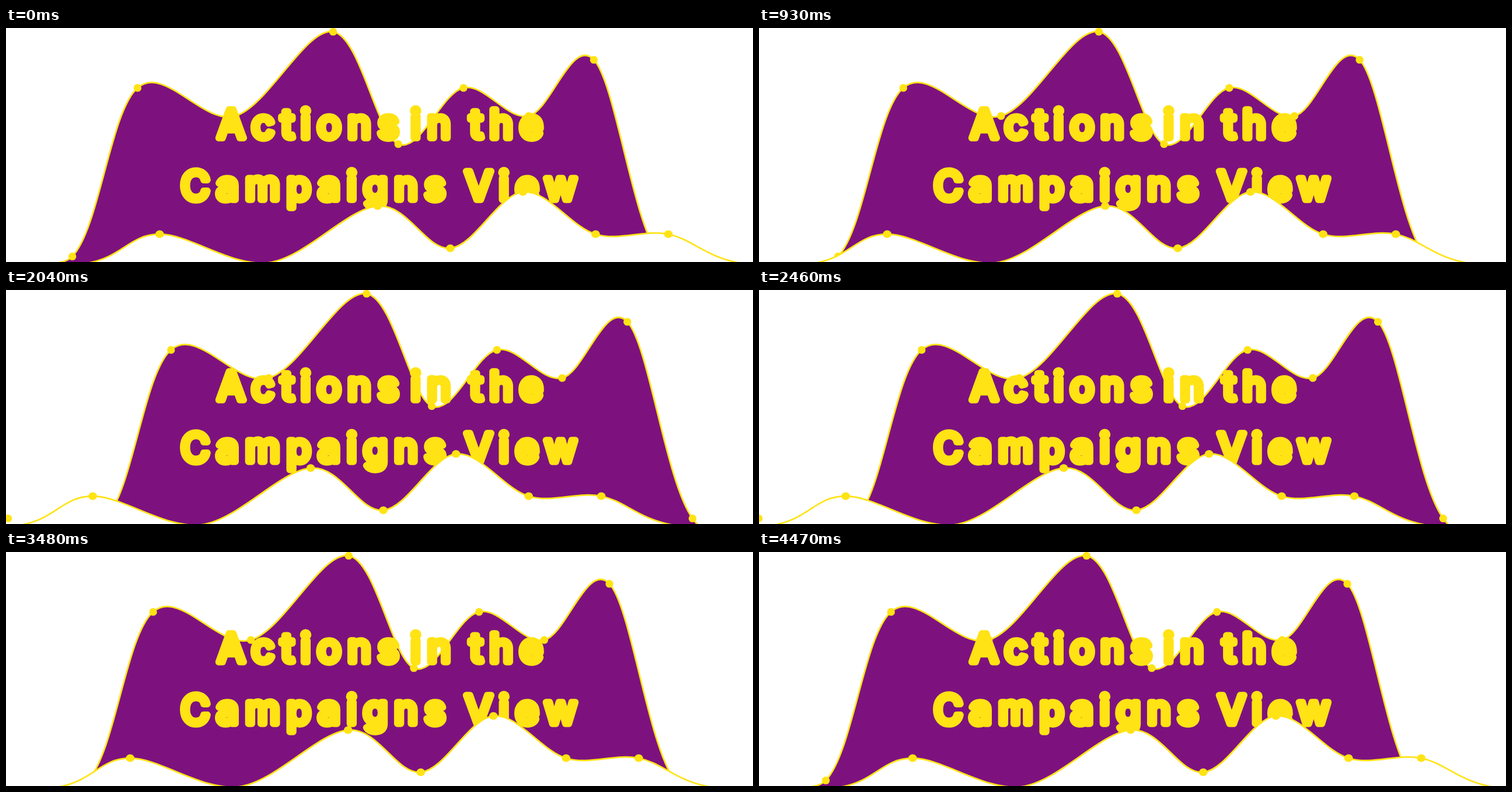
An HTML page with a canvas that plays this animation: 1280x402 px, repeating every 4500 ms.

```html
<!DOCTYPE html>
<html lang="en">
<head>
<meta charset="utf-8">
<title>Actions in the Campaigns View</title>
<style>
  html, body { margin: 0; width: 100%; height: 100%; overflow: hidden; background: #fff; }
  canvas { display: block; width: 100%; height: 100%; }
</style>
</head>
<body>
<canvas id="stage" width="1280" height="402"></canvas>
<script>
const ctx = document.getElementById('stage').getContext('2d');
const W = 1280, H = 402, LOOP = 4500;
const PURPLE = '#7d127f', YELLOW = '#ffe314';

// Waves: [column, level] pairs; the first and last points only shape the ends.
const toPoints = (pairs, dx, top, dy) => pairs.map(([c, l]) => [c * dx, top + l * dy]);

const back = toPoints(
  [[-5.5, 8], [-4, 8], [-3, 2], [-1.5, 3], [0, 0], [1, 4], [2, 2], [3, 3], [4, 1], [5, 8], [6.5, 9], [8, 10]],
  111.7, 6.4, 48.25);
const front = toPoints(
  [[-6, 5.7], [-4, 5.06], [-3, 3], [-1.5, 5.02], [0, 1], [1, 4], [2, 0], [3, 3], [4, 3], [5, 5.06], [7, 5.7]],
  124.5, 281.6, 24.2);

const words = [
  ['Actions', 358, 188.5], ['in', 692, 188.5], ['the', 789, 188.5],
  ['Campaigns', 297, 294.5], ['View', 782, 294.5]
];

const ease = p => p * p * (3 - 2 * p);

// Cardinal spline through the inner points.
function curve(pts) {
  for (let i = 1; i < pts.length - 2; i++) {
    const [a, b, c, d] = pts.slice(i - 1, i + 3);
    ctx.bezierCurveTo(
      b[0] + (c[0] - a[0]) / 6, b[1] + (c[1] - a[1]) / 6,
      c[0] - (d[0] - b[0]) / 6, c[1] - (d[1] - b[1]) / 6,
      c[0], c[1]);
  }
}

function wave(pts, x, fill, rx, ry, tail) {
  const [sx, sy] = pts[1];
  ctx.save();
  ctx.translate(x, 0);
  ctx.beginPath();
  if (tail) {
    ctx.moveTo(sx - 30, sy + 16);
    ctx.quadraticCurveTo(sx - 26, sy + 11.5, sx - 21, sy + 10);
    ctx.bezierCurveTo(sx - 14, sy + 9, sx - 7, sy + 7.2, sx, sy);
  } else {
    ctx.moveTo(sx, sy);
  }
  curve(pts);
  ctx.lineTo(pts[pts.length - 2][0], H + 60);
  ctx.lineTo(sx - 30, H + 60);
  ctx.closePath();
  ctx.fillStyle = fill;
  ctx.fill();
  ctx.strokeStyle = YELLOW;
  ctx.lineWidth = 2.7;
  ctx.stroke();
  ctx.fillStyle = YELLOW;
  for (const [px, py] of pts) {
    if (py > H - 5) continue;
    ctx.beginPath();
    ctx.ellipse(px, py, rx, ry, 0, 0, Math.PI * 2);
    ctx.fill();
  }
  ctx.restore();
}

function title() {
  ctx.font = '400 67px Inter, sans-serif';
  ctx.letterSpacing = '12px';
  ctx.lineJoin = ctx.lineCap = 'round';
  ctx.lineWidth = 11.5;
  ctx.fillStyle = ctx.strokeStyle = YELLOW;
  for (const [word, left, base] of words) {
    const x = left + 5.75 + ctx.measureText(word).actualBoundingBoxLeft;
    ctx.strokeText(word, x, base);
    ctx.fillText(word, x, base);
  }
}

function draw(now) {
  const p = (now % LOOP) / (LOOP / 2);
  const rising = p < 1;
  const swing = rising ? p : 2 - p;
  ctx.fillStyle = '#fff';
  ctx.fillRect(0, 0, W, H);
  wave(back, 560.5 + 58.8 * (rising ? ease(swing) : swing), PURPLE, 6.7, 6.7, true);
  title();
  wave(front, 636.8 - 117.6 * ease(swing), '#fff', 7.3, 6.6, false);
}

let start;
function tick(now) {
  start ??= now;
  draw(now - start);
  requestAnimationFrame(tick);
}
draw(0);
requestAnimationFrame(tick);
</script>
</body>
</html>
```
